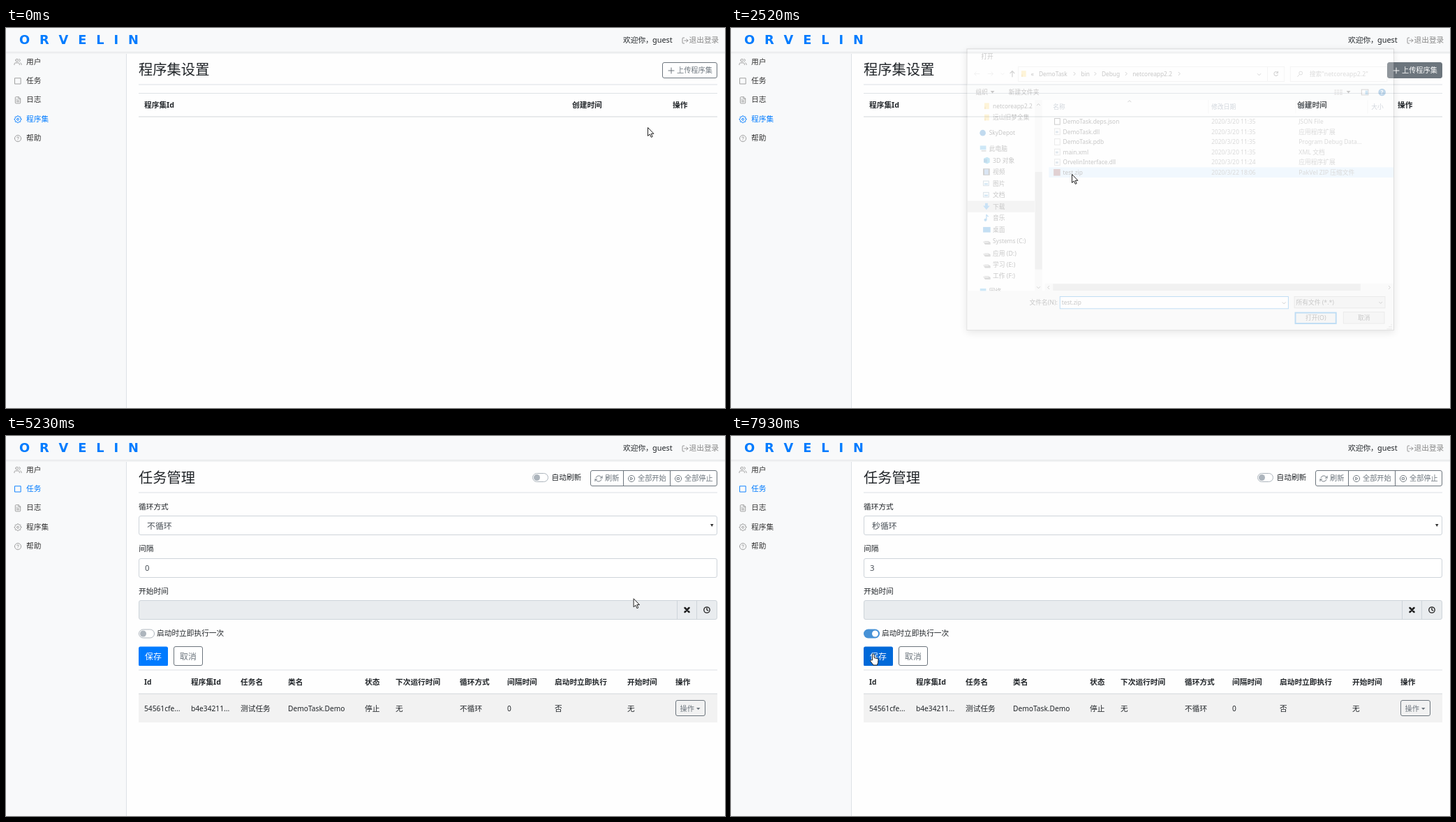
These frames come from a looping animation (1030x544 px, 8 s). An HTML page:

```html
<!DOCTYPE html>
<html lang="zh-CN">
<head>
<meta charset="utf-8">
<title>程序集与任务</title>
<style>
html, body { margin: 0; width: 100%; height: 100%; overflow: hidden; background: #fefefe; }
svg { display: block; width: 100vw; height: 100vh; }
text { font-family: "Noto Sans", "Noto Sans CJK SC", "Noto Sans CJK", sans-serif; white-space: pre; }
.wordmark { font: 700 17.8px "DejaVu Sans", sans-serif; letter-spacing: 13.9px; }
.icon { fill: none; stroke-width: 2; stroke-linecap: round; stroke-linejoin: round; }
#dialog { filter: drop-shadow(0 3px 6px rgba(0, 0, 0, .4)); }
</style>
</head>
<body>
<svg id="stage" viewBox="0 0 1030 544"></svg>
<script>
const LOOP = 8000;
const GREY = '#6c757d', LINE = '#dee2e6', INK = '#212529', BLUE = '#007bff';

// Drawing helpers; cy is the vertical middle of a line of text.
const text = (x, cy, s, { size = 10.7, fill = INK, bold, end, id = '' } = {}) => {
  const px = /^[\x00-\x7f]*$/.test(s) ? size * .955 : size;
  return `<text id="${id}" x="${x}" y="${cy + size * .37}" font-size="${px}" fill="${fill}"
    font-weight="${bold ? 700 : 400}" text-anchor="${end ? 'end' : 'start'}">${s}</text>`;
};
const rect = (x, y, w, h, fill, extra = '') =>
  `<rect x="${x}" y="${y}" width="${w}" height="${h}" fill="${fill}" ${extra}/>`;
const box = (x, y, w, h, fill = '#fff', stroke = '#ced4da', r = 2.5, extra = '') =>
  rect(x + .5, y + .5, w - 1, h - 1, fill, `stroke="${stroke}" rx="${r}" ${extra}`);
const rule = (y, color = LINE) => rect(190, y, 829, 1, color);
const dot = (x, y, r, fill) => `<circle cx="${x}" cy="${y}" r="${r}" fill="${fill}"/>`;
const path = (d, stroke = GREY, width = 1, fill = 'none') =>
  `<path d="${d}" fill="${fill}" stroke="${stroke}" stroke-width="${width}"/>`;
const shape = (d, fill) => path(d, 'none', 0, fill);
const group = (id, body, extra = '') => `<g id="${id}" ${extra}>${body}</g>`;

const ring = (r, cx = 12, cy = 12) => `M${cx - r} ${cy}a${r} ${r} 0 1 0 ${2 * r} 0a${r} ${r} 0 1 0 ${-2 * r} 0`;
const gear = 'M' + Array.from({ length: 32 }, (_, i) => {
  const r = i % 4 < 2 ? 11 : 8.6, a = (i - .5) * Math.PI / 16;
  return `${(12 + r * Math.cos(a)).toFixed(1)} ${(12 + r * Math.sin(a)).toFixed(1)}`;
}).join('L') + 'z' + ring(3.2);
const ICONS = {
  users: 'M17 21v-2a4 4 0 0 0-4-4H5a4 4 0 0 0-4 4v2M23 21v-2a4 4 0 0 0-3-3.9M16 3.1a4 4 0 0 1 0 7.8' + ring(4, 9, 7),
  board: 'M3 3h18v18H3z',
  file: 'M14 2H6a2 2 0 0 0-2 2v16a2 2 0 0 0 2 2h12a2 2 0 0 0 2-2V8zM14 2v6h6M16 13H8M16 17H8M10 9H8',
  gear,
  help: ring(10) + 'M9.1 9a3 3 0 0 1 5.8 1c0 2-3 3-3 3M12 17h.01',
  exit: 'M9 21H5a2 2 0 0 1-2-2V5a2 2 0 0 1 2-2h4M16 17l5-5-5-5M21 12H9',
  refresh: 'M23 4v6h-6M1 20v-6h6M3.5 9a9 9 0 0 1 14.9-3.4L23 10M1 14l4.6 4.4A9 9 0 0 0 20.5 15',
  play: ring(10) + 'M10 8l6 4-6 4z',
  stop: ring(10) + 'M9 9h6v6H9z',
  plus: 'M12 4v16M4 12h16',
  cross: 'M18 6L6 18M6 6l12 12',
  clock: ring(10) + 'M12 6v6l4 2'
};
const icon = (name, cx, cy, stroke = GREY, k = .46, extra = '') =>
  `<path class="icon" d="${ICONS[name]}" stroke="${stroke}"
    transform="translate(${cx - 12 * k} ${cy - 12 * k}) scale(${k})" ${extra}/>`;

const NAV = [['users', '用户'], ['board', '任务'], ['file', '日志'], ['gear', '程序集'], ['help', '帮助']];
const navY = i => 48 + 27.4 * i;

const frame = () =>
  rect(0, 0, 173, 544, '#f8f9fa') + rect(172, 35, 1, 509, LINE) +
  rect(0, 34, 1030, 3, '#f1f2f3') + rect(0, 0, 1030, 34, '#f8f9fa') + rect(0, 34, 1030, 1, '#e6e8ea') +
  `<text class="wordmark" x="19" y="23" fill="${BLUE}">ORVELIN</text>` +
  text(884, 17, '欢迎你，') + text(926, 17, 'guest', { size: 11.4 }) +
  icon('exit', 973, 18, '#888', .44) + text(978.5, 17, '退出登录', { fill: '#888' }) +
  NAV.map(([name, label], i) => group('nav' + i,
    icon(name, 17, navY(i) + .5, '#999') + text(29, navY(i) - .3, label))).join('');

const button = (id, x, y, w, body) => group(id, box(x, y, w, 23, '#fff0', GREY) + body);
const toggle = (x, cy, id = '') => group(id,
  box(x, cy - 6.5, 23, 13, '#fff', '#adb5bd', 6) + dot(x + 6.5, cy, 4.5, '#adb5bd'));

const badge = (x, y, w, label, fill) =>
  rect(x, y, w, 16, fill, 'rx="2.5"') + text(x + 5, y + 8, label, { size: 8.6, fill: '#fff', bold: true });

const assemblyPage = () =>
  text(190, 59, '程序集设置', { size: 20.3 }) + rule(80.5) + rule(93) +
  button('upload', 940, 49, 79, icon('plus', 953, 61, GREY, .5) + text(961, 60.3, '上传程序集', { size: 10.2, fill: GREY })) +
  group('assembly',
    rect(190, 127, 829, 41, '#f2f2f2') + rule(167.5) + text(198, 148, 'b4e34211-3744-4f35-9ace-15693700e5da') +
    text(811, 148, '2020-03-22 23:52:27') +
    button('', 955, 137, 48, icon('cross', 967, 149, GREY, .5) + text(975.5, 148, '删除', { size: 10.2, fill: GREY })) +
    text(198, 185.5, '任务：', { bold: true }) + badge(230, 178, 79, 'DemoTask.Demo', '#4a06f5') +
    text(198, 210.5, '文件：', { bold: true }) + badge(230, 203, 66, 'DemoTask.dll', '#d2691e') +
    badge(298, 203, 49, 'main.xml', '#d2691e')) +
  [[198, '程序集Id'], [811, '创建时间'], [955, '操作']].map(([x, s]) => text(x, 110.5, s, { bold: true })).join('') +
  rule(126.5, '#d3d7db');

const COLUMNS = [
  [198, 'Id', '54561cfe...'], [265, '程序集Id', 'b4e34211...'], [336, '任务名', '测试任务'],
  [404, '类名', 'DemoTask.Demo'], [514, '状态', '停止'], [558, '下次运行时间', '无'], [650, '循环方式', '不循环'],
  [718, '间隔时间', '0'], [786, '启动时立即执行', '否'], [890, '开始时间', '无'], [959, '操作', '']
];
const taskTable = () =>
  rule(-.5) + rect(190, 34, 829, 41, '#f2f2f2') + rule(33.5, '#d3d7db') +
  COLUMNS.map(([x, head, cell]) => text(x, 17.5, head, { bold: true }) + text(x, 55, cell)).join('') +
  button('action', 959, 43, 43, text(965.5, 55, '操作', { size: 10.2, fill: GREY }) +
    shape('M989 54h5.5l-2.75 3z', GREY));

const glow = (id, y) => group(id, box(189, y - 1, 831, 30, 'none', '#bfdeff', 3.5, 'stroke-width="2.5"') +
  box(190, y, 829, 28, 'none', '#80bdff'));

const form = () =>
  text(190, 101, '循环方式') + box(190, 114, 829, 28) + glow('selectGlow', 114) +
  text(202, 128.5, '不循环', { size: 11.9, fill: '#495057', id: 'mode' }) + shape('M1009 126h4.5l-2.25 4z', '#333') +
  text(190, 161, '间隔') + box(190, 175, 829, 28) + glow('inputGlow', 175) +
  rect(199, 182, 6.5, 14, '#3390ff', 'id="selection"') +
  text(199, 189, '0', { size: 11.9, fill: '#495057', id: 'interval' }) + rect(205.5, 182, 1, 14, '#333', 'id="caret"') +
  group('spinner', rect(999, 182, 10, 14, '#f1f1f1') + shape('M1001 187.5h6l-3-3.5zM1001 190.5h6l-3 3.5z', '#444')) +
  text(190, 222, '开始时间') + box(190, 235, 829, 28, '#e9ecef') +
  rect(961, 236, 1, 26, '#ced4da') + rect(989, 236, 1, 26, '#ced4da') +
  icon('cross', 975.5, 249, '#222', .5, 'style="stroke-width:5"') + icon('clock', 1004, 249, '#222', .42, 'style="stroke-width:3.2"') +
  toggle(190, 283, 'once') +
  group('onceOn', rect(190, 276.5, 23, 13, '#4691d6', 'rx="6.5"') + dot(206.5, 283, 4.5, '#fff')) +
  text(216, 282.5, '启动时立即执行一次') +
  rect(190, 301.5, 42, 28, BLUE, 'rx="2.5" id="save"') + text(199, 315.5, '保存', { size: 11.9, fill: '#fff' }) +
  box(240, 301, 42, 28, '#fff', GREY) + text(249, 315.5, '取消', { size: 11.9, fill: GREY });

const taskPage = () =>
  text(190, 59, '任务管理', { size: 20.3 }) + rule(80.5) + toggle(754, 59.5) + text(781.5, 59, '自动刷新') +
  box(837, 49, 182, 23, '#fff', GREY) + rect(884, 49, 1, 22, GREY) + rect(951, 49, 1, 22, GREY) +
  [['refresh', 849, '刷新'], ['play', 896, '全部开始'], ['stop', 963, '全部停止']].map(([name, x, s]) =>
    icon(name, x, 61, GREY) + text(x + 9, 60.5, s, { size: 10.2, fill: GREY })).join('') +
  '<clipPath id="fold"><rect id="foldBox" x="180" y="93" width="850" height="0"/></clipPath>' +
  group('form', form(), 'clip-path="url(#fold)"') + group('table', taskTable());

// File dialog
const FILES = [
  ['DemoTask.deps.json', '20 11:35', 'JSON File'], ['DemoTask.dll', '20 11:35', '应用程序扩展'],
  ['DemoTask.pdb', '20 11:35', 'Program Debug Data...'], ['main.xml', '20 11:35', 'XML 文档'],
  ['OrvelinInterface.dll', '20 11:24', '应用程序扩展'], ['test.zip', '22 18:06', 'PakVel ZIP 压缩文件']
];
const PLACES = [
  ['netcoreapp2.2', 107, 'folder'], ['远山旧梦全集', 124, 'folder'], ['SkyDepot', 147, 'cloud'], ['此电脑', 170, 'pc'],
  ['3D 对象', 188, 'cube'], ['视频', 205, 'film'], ['图片', 222, 'sheet'], ['文档', 239, 'sheet'], ['下载', 256.5, 'down'],
  ['音乐', 273.5, 'note'], ['桌面', 291, 'screen'], ['Systems (C:)', 308, 'drive'], ['应用 (D:)', 326, 'drive'],
  ['学习 (E:)', 343, 'drive'], ['工作 (F:)', 360, 'drive'], ['网络', 382.5, 'pc']
];
const GLYPHS = {
  folder: (x, y) => rect(x - 3, y - 4.5, 7, 9, '#ffd766') + rect(x - 3, y + 1, 2, 3.5, '#e8b339'),
  cloud: (x, y) => dot(x, y, 4.5, '#0a6fc2'),
  pc: (x, y) => rect(x - 4, y - 4, 9, 6, '#3ba7e5') + rect(x - 2, y + 3, 7, 1.5, '#777'),
  cube: (x, y) => shape(`M${x - 4} ${y - 3}l5-2 4 2v6l-4 2-5-2z`, '#27a5dc') + rect(x - 4, y - 2, 5, 5, '#0e6fb0'),
  film: (x, y) => rect(x - 5, y - 5, 10, 10, '#444') + rect(x - 3, y - 4, 6, 8, '#6fa0d8'),
  sheet: (x, y) => box(x - 5, y - 4, 9, 8, '#eef6fc', '#6b8fa8', 0) + rect(x - 3, y, 5, 2, '#3d9bd8'),
  down: (x, y) => shape(`M${x - 2} ${y - 5}h4v4h3l-5 6-5-6h3z`, '#2a8ede'),
  note: (x, y) => path(`M${x} ${y + 3}v-8q1 2 3 3`, '#1b87d8', 1.3) + dot(x - 1.5, y + 3, 2, '#1b87d8'),
  screen: (x, y) => rect(x - 5, y - 4, 11, 8, '#1481d4'),
  drive: (x, y) => shape(`M${x - 5} ${y + 1}l3-1h5l3 2v3h-8z`, '#777') + rect(x - 4, y + 1, 7, 1.2, '#ddd')
};
const small = (x, cy, s, fill = '#222', more) => text(x, cy, s, { size: 9.1, fill, ...more });
const chevron = (x, y, angle, color = '#444') =>
  `<path d="M-1.2-2.5l2.5 2.5-2.5 2.5" fill="none" stroke="${color}" transform="translate(${x} ${y}) rotate(${angle})"/>`;
const fileY = i => 130 + 15.15 * i;

const fileIcon = i => i === 5 ? rect(455, fileY(i) - 5, 10, 10, '#8a4b50') :
  box(456, fileY(i) - 5, 9, 10, '#fff', i ? '#aaa' : '#333', 0) + (i % 2 || i === 4 ? rect(458, fileY(i) - 1, 4, 3, '#8aa6bd') : '');

const dialog = () =>
  rect(326, 22, 635.5, 418.5, '#fff', 'stroke="#777"') + small(347, 33, '打开') +
  group('titleIcons', dot(338, 33, 5, '#4a9a58') + path('M946.5 29.5l7 7m0-7l-7 7', '#222')) +
  path('M345 59h-8m3-3l-3 3 3 3M357 59h8m-3-3l3 3-3 3', '#ccc') + chevron(379, 59, 90, '#ccc') +
  path('M393.5 64v-9m-3.5 3.5l3.5-3.5 3.5 3.5', '#444', 1.2) +
  box(402, 48, 397, 23, '#fff', '#d9d9d9', 0) + rect(773, 48, 1, 22, '#d9d9d9') + GLYPHS.folder(410, 59) +
  [[421, '«'], [433, 'DemoTask'], [496, 'bin'], [526.5, 'Debug'], [572.5, 'netcoreapp2.2']].map(([x, s]) => small(x, 59, s)).join('') +
  [486, 517, 563, 642].map(x => chevron(x, 59, 0)).join('') + chevron(761, 60, 90) +
  path('M788.5 57a3 3 0 1 0 .5 3M789 55v3h-3', '#555', 1.1) +
  box(807, 48, 145, 23, '#fff', '#d9d9d9', 0) + path(ring(2.5, 823, 58) + 'M821 60l-3 3.5', '#777') + small(836, 59, '搜索"netcoreapp2.2"', '#777') +
  rect(326.5, 74, 634.5, 24, '#f5f6f7') + small(339, 86.5, '组织') + shape('M361 84.5h6l-3 3.5zM891 84.5h6l-3 3.5z', '#222') +
  small(388, 86.5, '新建文件夹') + path('M873 83.5h3m1 0h3m1 0h4M873 86.5h3m1 0h3m1 0h4M873 89.5h3m1 0h3m1 0h4', '#888', 1.3) +
  box(913, 82, 11, 9, '#fff', '#555', 0) + rect(919, 84, 4, 6, '#49a3dc') +
  dot(944, 86.5, 5.5, '#0063b1') + small(941.8, 86.5, '?', '#fff', { bold: true }) +
  rect(327, 248, 100, 17, '#d9d9d9') +
  PLACES.map(([label, y, kind]) => {
    const x = ['pc', 'cloud'].includes(kind) ? 349.5 : 355;
    return GLYPHS[kind](x, y) + small(x + 9.5, y, label);
  }).join('') +
  rect(427, 98, 11, 284, '#f0f0f0') + rect(427.5, 205, 10.5, 145, '#cdcdcd') + chevron(432.5, 105, -90) + chevron(432.5, 377, 90) +
  rect(448, 0, 513, 15.2, '#e5f3ff', 'id="hoverRow"') +
  [[454, '名称'], [690, '修改日期'], [820, '类型'], [928, '大小']].map(([x, s]) => small(x, 108, s, '#4c607a')).join('') +
  [685, 815, 922].map(x => rect(x, 98, 1, 20, '#e5e5e5')).join('') + chevron(568, 100, -90) +
  FILES.map(([name, date, type], i) => fileIcon(i) + small(469, fileY(i), name) +
    small(690, fileY(i), '2020/3/' + date, '#6d6d6d') + small(820, fileY(i), type, '#6d6d6d')).join('') +
  rect(442, 371, 519, 11, '#f0f0f0') + rect(454, 371.5, 458, 10.5, '#cdcdcd') + chevron(447.5, 377, 180) + chevron(955, 377, 0) +
  rect(326.5, 382, 634.5, 58, '#f0f0f0') + small(461, 399.5, '文件名(N):', '#222', { end: true }) +
  box(464, 390, 341, 19, '#fff', '#0078d7', 0) + rect(467.5, 394, 1, 12, '#222', 'id="nameCaret"') +
  small(467, 399.5, 'test.zip', '#222', { id: 'fileName' }) + chevron(798, 400, 90) +
  box(813, 390, 136, 18, '#e1e1e1', '#adadad', 0) + small(816, 399.5, '所有文件 (*.*)') + chevron(942, 399.5, 90) +
  rect(815, 414.5, 60.5, 16, '#e1e1e1', 'stroke="#0078d7" stroke-width="2"') + small(830, 422, '打开(O)') +
  box(886, 413, 62, 18, '#e1e1e1', '#adadad', 0) + small(908, 422, '取消') +
  path('M951 438.5h8M954 435.5h5M957 432.5h2', '#bbb', 1.5);

const pointer = () =>
  '<circle id="click" r="10.5" fill="#fff94f" fill-opacity=".9"/>' + group('cursor',
    group('arrow', path('M.5.5v12l2.8-2.5 2 4.4 1.9-.9-2-4.2h3.7z', '#222', 1, '#fff')) +
    group('hand', path('M-1.5 9V1.2a1.3 1.3 0 0 1 2.6 0v4.3l4.4.9q1.6.4 1.5 2l-.4 4-1.2 3.6h-5.4l-4.2-5.5q-.6-1.5 1-1.8z', '#222', 1, '#fff')) +
    group('beam', path('M-3-6q3 0 3 1.5 0-1.5 3-1.5M0-4.5v9M-3 6q3 0 3-1.5 0 1.5 3 1.5', '#222', 1.1)));

document.getElementById('stage').innerHTML =
  rect(0, 0, 1030, 544, '#fefefe') + frame() + group('assemblyPage', assemblyPage()) + group('taskPage', taskPage()) +
  group('dialog', dialog()) + pointer();

// Motion
const PATH = [
  [0, 919, 142], [100, 919, 142], [430, 965, 62], [920, 965, 62], [1350, 779, 175], [1520, 779, 175],
  [2080, 488, 209], [2700, 488, 209], [3400, 430, 70], [3780, 49, 81], [4390, 49, 81], [4570, 975, 149],
  [4640, 975, 149], [4760, 945, 251], [5180, 945, 251], [5380, 640, 128], [5560, 560, 130], [5800, 230, 195],
  [6050, 230, 195], [6280, 160, 193], [6600, 160, 193], [6830, 212, 238], [7080, 202, 281], [7720, 202, 283],
  [7840, 204, 312], [8000, 204, 312]
];
const CLICKS = [[620, 700], [2150, 2240], [4310, 4390], [4590, 4650], [5400, 5470], [5830, 5940], [7130, 7220]];
const HANDS = [[400, 900], [3740, 4440], [4530, 4670], [7000, 8000]];
const BEAMS = [[5770, 6780]];

const $ = id => document.getElementById(id);
const within = (spans, t) => spans.some(([a, b]) => t >= a && t < b);
const clamp = (t, a, b) => Math.min(1, Math.max(0, (t - a) / (b - a)));
const swing = p => .5 - .5 * Math.cos(Math.PI * p);
const fade = (t, from, to) => clamp(t, from, from + 150) * (1 - clamp(t, to, to + 150));
const show = (id, on) => $(id).setAttribute('opacity', Number(on));

function cursorAt(t) {
  const i = PATH.findIndex(key => key[0] > t);
  const [t0, x0, y0] = PATH[i - 1], [t1, x1, y1] = PATH[i];
  const p = swing(clamp(t, t0, t1));
  return [x0 + (x1 - x0) * p, y0 + (y1 - y0) * p];
}

function paintButton(id, dark) {
  const [outline, ...content] = $(id).children;
  outline.setAttribute('fill', dark ? GREY : '#fff0');
  for (const el of content) el.setAttribute(el.classList.contains('icon') ? 'stroke' : 'fill', dark ? '#fff' : GREY);
}

function renderNav(t, onTasks) {
  NAV.forEach((_, i) => {
    const active = i === (onTasks ? 1 : 3), hover = i === 1 && t > 3740;
    const [mark, label] = $('nav' + i).children;
    mark.setAttribute('stroke', active ? BLUE : hover ? '#333' : '#999');
    label.setAttribute('fill', active ? BLUE : '#333');
  });
}

function renderDialog(t, x, y) {
  const shut = clamp(t, 2400, 2560), opened = clamp(t, 740, 900), picked = t >= 2170;
  const scale = .9 + .1 * swing(opened) - .05 * shut;
  show('dialog', opened * (1 - shut));
  $('dialog').setAttribute('transform', `translate(643.5 231.5) scale(${scale}) translate(-643.5 -231.5)`);
  const row = Math.floor((y - 122.4) / 15.15);
  show('hoverRow', row >= 0 && row < 6 && x < 961);
  $('hoverRow').setAttribute('y', fileY(row) - 7.6);
  $('hoverRow').setAttribute('fill', picked ? '#cce8ff' : '#e5f3ff');
  show('titleIcons', shut === 0);
  show('fileName', picked);
  show('nameCaret', !picked);
}

function renderForm(t) {
  const height = 242 * swing(clamp(t, 4770, 5170)), selecting = t >= 6200 && t < 6450;
  $('foldBox').setAttribute('height', Math.max(0, height - 6));
  $('table').setAttribute('transform', `translate(0 ${93 + height})`);
  paintButton('action', t >= 4540 && t < 5230);
  show('selectGlow', fade(t, 5380, 5960));
  show('inputGlow', fade(t, 5960, 6980));
  $('mode').textContent = t < 5580 ? '不循环' : '秒循环';
  $('interval').textContent = t < 6450 ? '0' : '3';
  $('interval').setAttribute('fill', selecting ? '#fff' : '#495057');
  show('selection', selecting);
  show('caret', t >= 5840 && t < 6980 && !selecting);
  show('spinner', t >= 5770 && t < 6980);
  show('once', t < 7180);
  show('onceOn', t >= 7180);
  $('save').setAttribute('fill', t >= 7810 ? '#0069d9' : BLUE);
}

function renderPointer(t, x, y) {
  const kind = within(HANDS, t) ? 'hand' : within(BEAMS, t) ? 'beam' : 'arrow';
  for (const name of ['arrow', 'hand', 'beam']) show(name, name === kind);
  $('cursor').setAttribute('transform', `translate(${x} ${y})`);
  $('click').setAttribute('cx', x - 1);
  $('click').setAttribute('cy', y);
  show('click', within(CLICKS, t));
}

function render(t) {
  const [x, y] = cursorAt(t), onTasks = t >= 4390;
  show('assemblyPage', !onTasks);
  show('taskPage', onTasks);
  paintButton('upload', t >= 420 && t < 2760);
  show('assembly', t >= 2610);
  renderNav(t, onTasks);
  renderDialog(t, x, y);
  renderForm(t);
  renderPointer(t, x, y);
}

const start = performance.now();
function tick() {
  render((performance.now() - start) % LOOP);
  requestAnimationFrame(tick);
}
tick();
</script>
</body>
</html>
```
